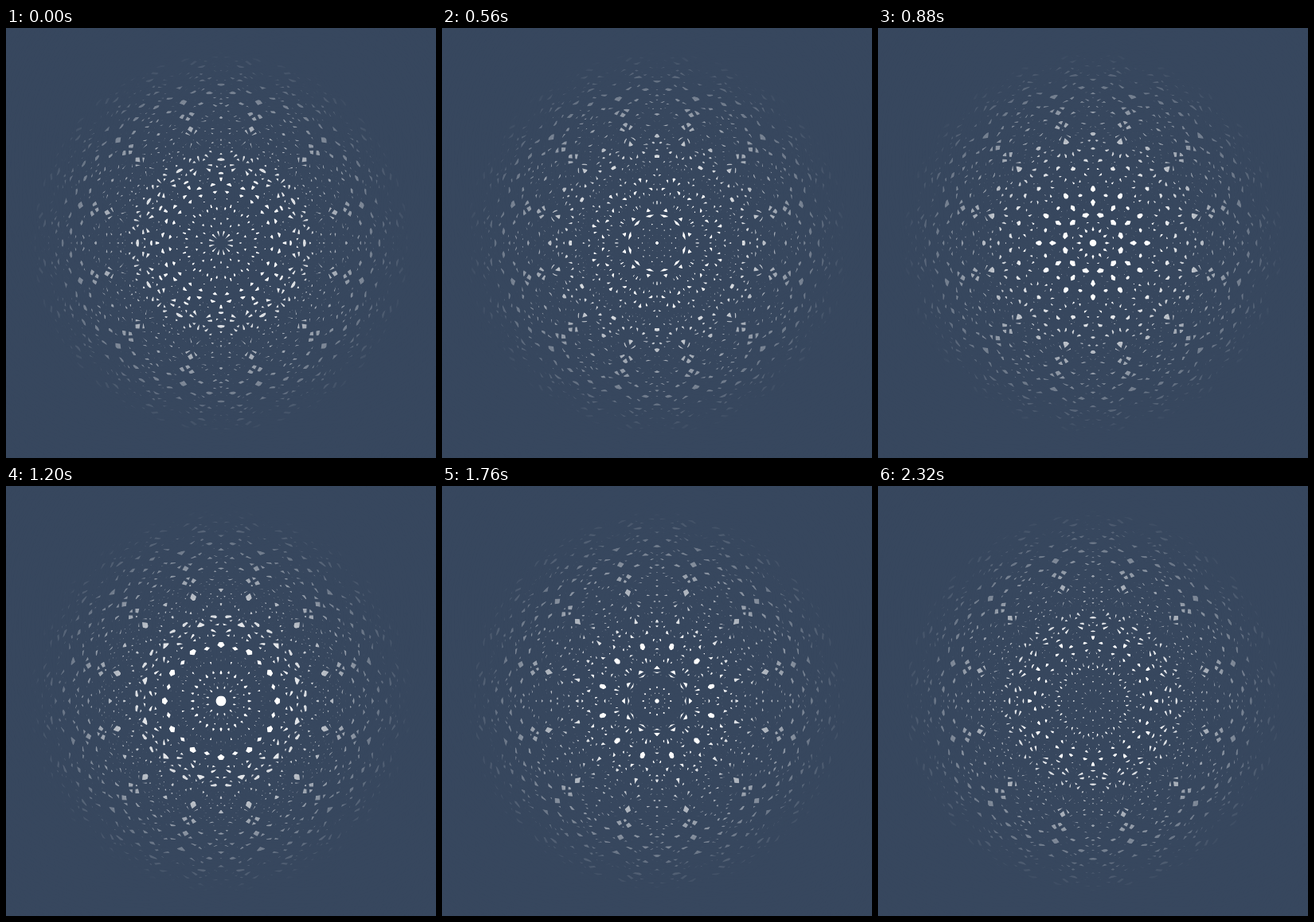
Recreate the animation shown at these times as an HTML page with a canvas. Size 540 by 540 pixels, loop 2400 ms.

```html
<!DOCTYPE html>
<html>
<head>
<meta charset="utf-8">
<style>
  html, body { margin: 0; width: 100%; height: 100%; overflow: hidden; background: #37475e; }
  canvas { display: block; width: 540px; height: 540px; }
</style>
</head>
<body>
<canvas id="stage" width="540" height="540"></canvas>
<script>
const ctx = document.getElementById('stage').getContext('2d');
const BG = '#37475e';
const SIZE = 540, MID = SIZE / 2;
const LOOP = 2400, STEP = 80;
const FAMILIES = 12;   // sets of concentric rings, evenly placed on a circle
const OFFSET = 118;    // distance of each set from the middle
const GAP = OFFSET / 7;
const LINE = 3.7;
const REACH = 240;

// White disc that fades into the background towards its rim
const glow = ctx.createRadialGradient(MID, MID, 75, MID, MID, REACH);
glow.addColorStop(0, 'rgba(255,255,255,1)');
glow.addColorStop(1, 'rgba(255,255,255,0)');

function drawRings(cx, cy, phase) {
  for (let r = phase * GAP; r < REACH + OFFSET + GAP; r += GAP) {
    ctx.beginPath();
    ctx.arc(cx, cy, r, 0, Math.PI * 2);
    ctx.stroke();
  }
}

function draw(phase) {
  ctx.fillStyle = BG;
  ctx.fillRect(0, 0, SIZE, SIZE);
  ctx.fillStyle = glow;
  ctx.fillRect(0, 0, SIZE, SIZE);

  // The rings hide the disc; only the spaces free of every set stay visible
  ctx.strokeStyle = BG;
  ctx.lineWidth = LINE;
  for (let k = 0; k < FAMILIES; k++) {
    const a = k * Math.PI * 2 / FAMILIES;
    drawRings(MID + OFFSET * Math.cos(a), MID + OFFSET * Math.sin(a), phase);
  }
}

const start = performance.now();
function tick() {
  const t = (performance.now() - start) % LOOP;
  draw(Math.floor(t / STEP) * STEP / LOOP);
  requestAnimationFrame(tick);
}
tick();
</script>
</body>
</html>
```
